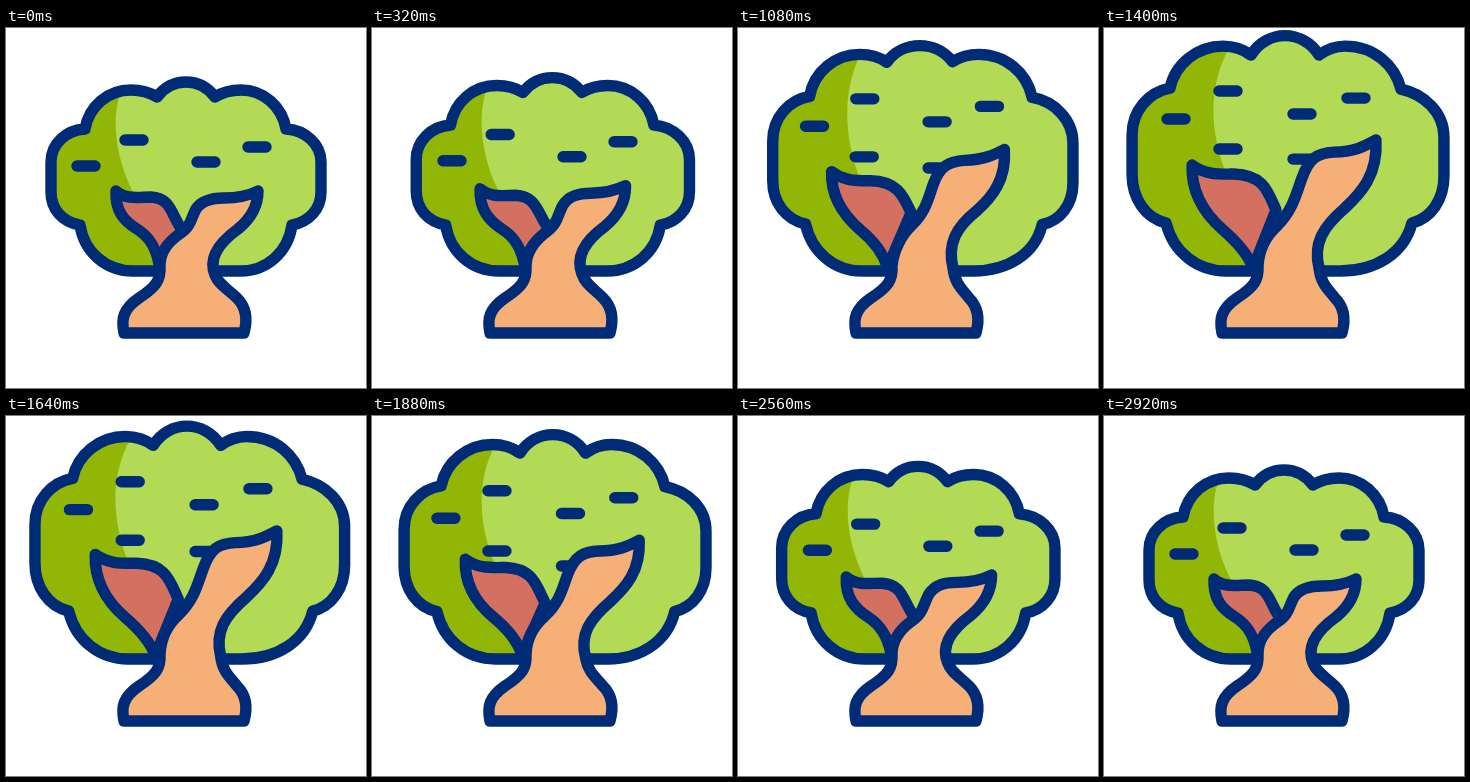
Write an HTML page that moves like this. It is 360x360 px and loops after 3000 ms.

```html
<!DOCTYPE html>
<html lang="en">
<head>
<meta charset="utf-8">
<title>Growing tree</title>
<style>
html, body { margin: 0; width: 100%; height: 100%; overflow: hidden; background: #fff; }
svg { display: block; width: 100vw; height: 100vh; }
.line { stroke: #002b76; stroke-width: 11.4; stroke-linecap: round; stroke-linejoin: round; }
</style>
</head>
<body>
<svg viewBox="0 0 360 360">
  <clipPath id="clip"><path data-shape="crown"/></clipPath>
  <path data-shape="crown" fill="#b2da54"/>
  <path data-shape="shade" fill="#91b606" clip-path="url(#clip)"/>
  <path data-shape="crown" class="line" fill="none"/>
  <path data-shape="dashes" class="line" fill="none"/>
  <path data-shape="branch" class="line" fill="#d37060"/>
  <path data-shape="trunk" class="line" fill="#f6b077"/>
</svg>
<script>
// Each shape has three poses: small, half grown, full.
const shapes = {
  crown: [
    `M127 243 C100 243 78 224 74 197 C56 194 45 181 45 164 L45 134 C45 116 60 102 79 101
     C83 78 102 62 125 62 C135 62 143 64 151 69 C166 49 194 49 209 69 C217 64 225 62 235 62
     C257 62 276 78 280 101 C299 102 315 116 315 134 L315 164 C315 181 303 194 286 197
     C282 225 260 243 235 243 Z`,
    `M126 243 C99 243 77 224 72 197 C53 193 40 178 40 158 L40 118 C40 95 56 78 76 75
     C80 50 100 33 124 33 C134 33 143 35 150 40 C166 21 198 21 214 39 C222 35 229 33 240 33
     C266 33 287 51 292 76 C313 79 331 97 331 120 L331 160 C331 181 318 195 301 198
     C295 226 268 243 236 243 Z`,
    `M122 243 C93 243 69 224 62 195 C41 190 28 170 28 146 L28 107 C28 82 45 64 66 60
     C71 36 93 18 119 18 C130 18 139 21 147 27 C163 1 199 1 215 27 C223 21 232 18 241 18
     C270 18 291 37 297 61 C320 66 340 84 340 109 L340 148 C340 172 327 190 308 195
     C300 226 271 243 236 243 Z`
  ],
  shade: [
    'M116 60 C104 90 110 130 126 162 L160 243 L0 243 L0 0 Z',
    'M119 34 C104 72 107 115 121 153 L160 243 L0 243 L0 0 Z',
    'M125 20 C104 59 106 100 120 140 L160 243 L0 243 L0 0 Z'
  ],
  branch: [
    `M110 163 C120 172 133 169 145 169 C166 170 165 188 177 203 L153 236
     C150 220 144 209 131 201 C118 193 109 183 110 163 Z`,
    `M98 149 C110 158 120 158 134 158 C160 158 167 172 174 187 L150 239
     C145 222 138 212 126 203 C112 191 97 173 98 149 Z`,
    `M88 137 C102 147 115 146 130 146 C160 147 164 164 172 182 L149 240
     C144 226 133 214 118 201 C101 186 87 166 88 137 Z`
  ],
  trunk: [
    `M118 305 C115 291 117 281 133 270 C150 259 155 252 154 238 C154 222 164 213 172 207
     C186 198 184 192 190 181 C196 172 206 170 218 170 C234 170 244 167 252 163
     C252 180 243 192 232 201 C214 214 202 230 209 247 C213 257 222 261 231 270
     C242 281 241 294 238 305 Z`,
    `M118 305 C115 291 117 281 133 270 C150 259 155 252 154 238 C156 222 165 206 174 197
     C188 184 189 172 194 159 C200 144 210 140 224 139 C242 138 252 134 262 129
     C264 155 252 172 238 184 C218 199 209 215 215 240 C217 256 224 261 231 270
     C242 281 241 294 238 305 Z`,
    `M118 305 C115 291 117 281 133 270 C150 259 155 252 154 238 C155 221 163 207 173 198
     C189 182 192 166 198 150 C205 130 213 125 230 124 C250 124 261 118 272 112
     C274 147 257 165 241 180 C219 199 209 215 215 240 C217 256 224 261 231 270
     C242 281 241 294 238 305 Z`
  ],
  dashes: [
    [[71, 138], [119, 112], [191, 134], [242, 119], [119, 179], [191, 210]],
    [[71, 104], [120, 77], [191, 100], [242, 85], [119, 135], [191, 147]],
    [[63, 91], [115, 63], [189, 86], [243, 70], [115, 121], [189, 131]]
  ].map(pose => pose.map(([x, y]) => `M${x} ${y} L${x + 18} ${y}`).join(' '))
};

// [time, pose]
const steps = [[0, 0], [160, 0], [780, 1], [1430, 2], [2810, 0], [3000, 0]];
const ease = k => (1 - Math.cos(Math.PI * k)) / 2;

function mix(from, to, k) {
  const ends = to.match(/\d+/g);
  let i = 0;
  return from.replace(/\d+/g, n => (+n + (ends[i++] - n) * k).toFixed(2));
}

const parts = [...document.querySelectorAll('[data-shape]')];

function draw(t) {
  const i = steps.findIndex(([end]) => end > t);
  const [t0, a] = steps[i - 1], [t1, b] = steps[i];
  const k = ease((t - t0) / (t1 - t0));
  for (const part of parts) {
    const poses = shapes[part.dataset.shape];
    part.setAttribute('d', mix(poses[a], poses[b], k));
  }
}

function tick() {
  draw(Math.floor(performance.now() % 3000 / 40) * 40);
  requestAnimationFrame(tick);
}
tick();
</script>
</body>
</html>
```
